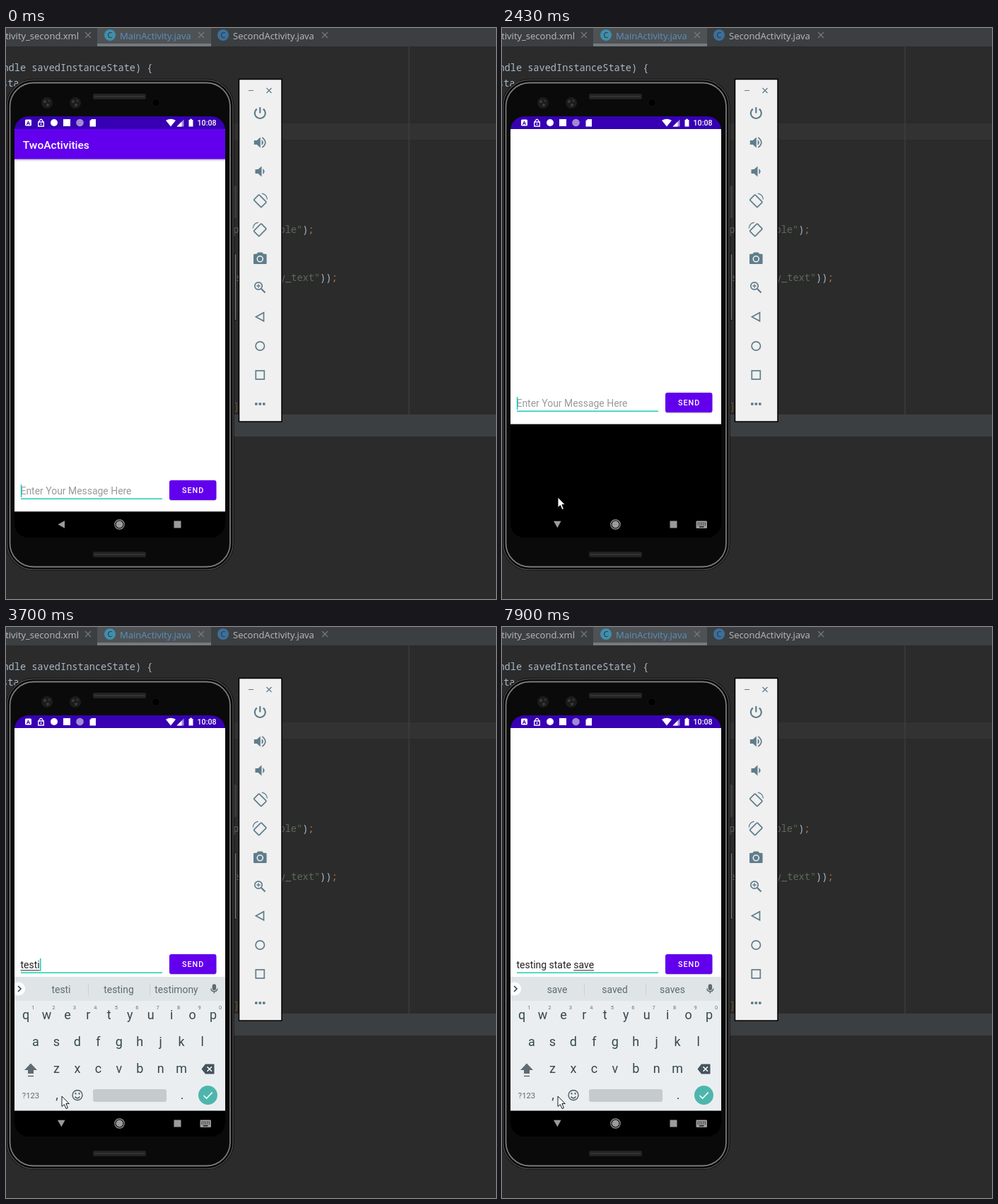
Animation of 693 by 808 pixels, one loop 8 s. Source, as an HTML page:

```html
<!DOCTYPE html>
<html lang="en">
<head>
<meta charset="utf-8">
<title>Message screen demo</title>
<style>
html, body { margin: 0; width: 100%; height: 100%; overflow: hidden; background: #2b2b2b; }
svg { display: block; width: 100%; height: 100%; }
text { white-space: pre; }
.tab { font: 13px "Open Sans", sans-serif; fill: #bbb; }
.code { font: 13.6px "Noto Sans Mono", monospace; fill: #a9b7c6; }
.str { fill: #5d6a56; }
.semi { fill: #b8743a; }
.ui { font-family: Roboto, sans-serif; }
.mid { text-anchor: middle; }
.field { font-size: 13.95px; }
.key { font-size: 18px; fill: #37474f; }
.digit { font-size: 7.5px; fill: #66737a; }
.word { font-size: 13.9px; fill: #5f6b73; }
.line { fill: none; stroke: #5f7d8c; stroke-width: 1.7; }
.thin { stroke-width: 1.3; }
.thick { stroke-width: 2.2; }
.solid { fill: #5f7d8c; }
</style>
</head>
<body>
<svg viewBox="0 0 693 808" preserveAspectRatio="none">
  <defs>
    <clipPath id="screen"><rect x="12" y="125" width="298" height="596" rx="20"/></clipPath>
    <clipPath id="window"><rect x="12" y="143" width="298" height="541.5"/></clipPath>
    <linearGradient id="shade" x2="0" y2="1"><stop stop-color="#b9b9bd"/><stop offset="1" stop-color="#fff"/></linearGradient>
    <path id="close" d="M-4-4 4 4M4-4-4 4" fill="none" stroke="#777b7e" stroke-width="1.1"/>
    <g id="sensor"><circle r="8" fill="#1c1c1c"/><circle cx="-3" cy="-2" r="2" fill="#3b3b3b"/><circle cx="3" cy="-3" r="1.6" fill="#343434"/><circle cx="1" cy="3" r="2" fill="#3b3b3b"/></g>
    <g id="speaker"><rect width="75" height="8" rx="2" fill="#232323"/><path d="M2 4H73" stroke="#333" stroke-width="2"/></g>
    <g id="volume"><path class="solid" d="M-8.5-3H-4.500L.5-7.500V7.500L-4.500 3H-8.5ZM2.300-4Q7 0 2.300 4Z"/></g>
    <g id="rotate"><rect class="line" x="-5.300" y="-7.500" width="10.600" height="15" rx="1" transform="translate(0 .8) rotate(-45)"/><path class="line thin" d="M2.500-9.800Q9.500-8.500 10-1.500"/></g>
  </defs>

  <!-- editor -->
  <rect width="693" height="808" fill="#2b2b2b"/>
  <rect y="135" width="693" height="23" fill="#323232"/>
  <path d="M570 26V547" stroke="#454545"/>
  <rect width="693" height="26" fill="#3c3f41"/>
  <rect x="129" width="161" height="26" fill="#4e5254"/>
  <rect x="129" y="22" width="161" height="4" fill="#747a80"/>
  <rect y="547" width="693" height="31" fill="#3c3f41"/>
  <g class="tab">
    <text x="103" y="15.5" text-anchor="end">activity_second.xml</text>
    <text x="161" y="15.5" style="fill:#5a8fc0">MainActivity.java</text>
    <text x="321" y="15.5">SecondActivity.java</text>
    <circle cx="147" cy="10" r="8" fill="#3f8fac"/>
    <circle cx="307" cy="10" r="8" fill="#3d6f9a"/>
    <g class="mid" font-size="11"><text x="147" y="14" style="fill:#23343d">C</text><text x="307" y="14" style="fill:#23343d">C</text></g>
  </g>
  <use href="#close" x="116" y="10"/><use href="#close" x="276" y="10"/><use href="#close" x="451" y="10"/>
  <g class="code">
    <text x="207.5" y="60.5" text-anchor="end">Bundle savedInstanceState) {</text>
    <text x="-6" y="83">sta</text>
    <text x="305" y="289.5"><tspan class="str">reply_visible"</tspan>)<tspan class="semi">;</tspan></text>
    <text x="322" y="357.5" class="str">e</text>
    <text x="387" y="357.5"><tspan class="str">y_text"</tspan>))<tspan class="semi">;</tspan></text>
    <text x="322" y="540" style="fill:#6b5428">]</text>
  </g>

  <!-- phone -->
  <rect x="319" y="223" width="7" height="46" rx="2" fill="#3c3c3c"/>
  <rect x="319" y="319" width="7" height="95" rx="2" fill="#151515"/>
  <path d="M324.5 320V413" stroke="#777" stroke-width="1.6"/>
  <rect y="72" width="322.5" height="696" rx="39" fill="#050505"/>
  <rect x="1.5" y="73.5" width="319.5" height="693" rx="37.5" fill="none" stroke="#484848" stroke-width="1.5"/>
  <rect x="5.5" y="77.5" width="311.5" height="685" rx="33.5" fill="#0a0a0a" stroke="#7c7c7c" stroke-width="1.8"/>
  <use href="#speaker" x="123" y="93"/><use href="#speaker" x="123" y="741"/>
  <use href="#sensor" x="58" y="106"/><use href="#sensor" x="98" y="106"/>
  <circle cx="212" cy="106" r="5.5" fill="#000" stroke="#141414"/>

  <g clip-path="url(#screen)" class="ui">
    <rect x="12" y="125" width="298" height="596" fill="#000"/>
    <g clip-path="url(#window)">
      <g id="app">
        <rect x="12" y="143" width="298" height="541.5" fill="#fff"/>
        <rect x="12" y="185" width="298" height="4" fill="url(#shade)"/>
        <rect x="12" y="143" width="298" height="42.5" fill="#6200ee"/>
        <text x="23.8" y="170.5" font-size="15.5" font-weight="500" fill="#fff">TwoActivities</text>
        <rect x="231" y="642" width="66.5" height="27.5" rx="3.5" fill="#000" opacity=".17"/>
        <rect x="231" y="640" width="66.5" height="28" rx="3" fill="#6200ee"/>
        <text x="249" y="658" font-size="10.85" font-weight="500" letter-spacing=".97" fill="#fff">SEND</text>
        <path d="M21 666.2H221" stroke="#1fcbb9" stroke-width="1.6"/>
        <text id="hint" class="field" x="20.5" y="660.3" fill="#9a9a9a">Enter Your Message Here</text>
        <text class="field" x="20.5" y="660.3" fill="#212121"><tspan id="done"></tspan><tspan id="active"></tspan></text>
        <rect id="underline" y="662.4" height="1" fill="#212121"/>
        <rect id="caret" y="646" width="1.6" height="18" fill="#1fcbb9"/>
      </g>
      <g id="keyboard">
        <rect x="12" y="495" width="298" height="190" fill="#eaeef1"/>
        <rect x="12" y="495" width="298" height="34" fill="#dfe4e7"/>
        <circle cx="17.5" cy="512" r="9.5" fill="#fff"/>
        <path d="M17 508 21 512 17 516" fill="none" stroke="#37474f" stroke-width="1.6"/>
        <path d="M116.5 504V521M203.5 504V521" stroke="#cbd1d5"/>
        <g id="words" class="word mid"></g>
        <g fill="none" stroke="#5f6b73" stroke-width="1.4"><rect x="292.4" y="506" width="4" height="7.5" rx="2" fill="#5f6b73"/><path d="M290 511.5Q290 515.8 294.4 515.8T298.8 511.5M294.4 516V518.5"/></g>
        <g id="keys" class="mid"></g>
        <path d="M35 617.5 44 627H39V632H31V627H26Z" fill="#5f6b73"/>
        <path d="M31 635.5H39" stroke="#5f6b73" stroke-width="1.6"/>
        <path d="M276.5 625.5 282 618.5H294.5V632.5H282Z" fill="#45535b"/>
        <path d="M284.5 622.3 291 628.8M291 622.3 284.5 628.8" stroke="#fff" stroke-width="1.5"/>
        <text class="mid" x="35" y="667" font-size="11.3" fill="#5f6b73">?123</text>
        <text class="key mid" x="72" y="668">,</text><text class="key mid" x="249" y="668">.</text>
        <g fill="none" stroke="#4c5a62" stroke-width="1.4"><circle cx="101" cy="662.5" r="7"/><path d="M97.5 664.5Q101 669 104.5 664.5"/><path d="M98.5 659V661.5M103.5 659V661.5" stroke-width="1.8"/></g>
        <rect x="123" y="654" width="104" height="18" rx="3" fill="#c5cacd"/>
        <circle cx="285.5" cy="662.5" r="13.5" fill="#4db6ac"/>
        <path d="M279.5 663 283.7 667 291.8 658.5" fill="none" stroke="#fff" stroke-width="1.7"/>
      </g>
    </g>

    <!-- status bar -->
    <rect x="12" y="125" width="298" height="18" fill="#3700b3"/>
    <g fill="#fff">
      <rect x="27" y="129.5" width="9" height="9" rx="1.5"/>
      <text class="mid" x="31.5" y="137" font-size="8" font-weight="700" style="fill:#3700b3">A</text>
      <path d="M47 133V131.5Q49.5 127 52 131.5V133M45.7 133H53.3V139H45.7Z" fill="none" stroke="#fff" stroke-width="1.3"/><circle cx="49.5" cy="136" r="1.1"/>
      <circle cx="68" cy="134" r="5"/>
      <rect x="81" y="129" width="10" height="10"/>
      <circle cx="104.5" cy="134" r="5.3" fill="#a08bd2"/>
      <path d="M121 129H127V139.5H118.5V131.5Z"/>
      <path d="M226 130.8Q233 126.5 240 130.8L233 139.5Z"/>
      <path d="M241.5 139.5 251.5 129.5V139.5Z" opacity=".55"/><path d="M241.5 139.5 248.5 132.5V139.5Z"/>
      <path d="M258.5 130H260V128.8H263V130H264.5V139.5H258.5Z"/>
      <text x="270.5" y="138" font-size="10.7" font-weight="500">10:08</text>
    </g>

    <!-- navigation bar -->
    <g fill="#9b9b9b">
      <path id="back" d="M73.5 702.5 83 697.2V707.8Z"/>
      <circle cx="160.5" cy="702.5" r="6.7" fill="none" stroke="#9b9b9b" stroke-width="1.2"/><circle cx="160.5" cy="702.5" r="5"/>
      <rect x="237.5" y="697.5" width="10" height="10" rx=".6"/>
      <g id="switcher"><rect x="274.5" y="697.5" width="15.5" height="10.5" rx="1.2"/><path d="M276.5 700.5H288.5M276.5 703H288.5" stroke="#000" stroke-width="1.2" stroke-dasharray="1.4 1.2"/><path d="M279 705.8H285.5" stroke="#000" stroke-width="1.2"/></g>
    </g>
  </g>

  <!-- emulator controls -->
  <rect x="329.5" y="72.5" width="60.5" height="484.5" fill="#f0f0f0" stroke="#000" stroke-width="1.5"/>
  <path d="M343 88.5H350M368.5 85 375.5 92M375.5 85 368.5 92" stroke="#5f7d8c" stroke-width="1.2"/>
  <path class="line thick" transform="translate(359.3 120.5)" d="M-4.5-6A7.5 7.5 0 1 0 4.5-6M0-8.5V0"/>
  <g transform="translate(359.3 162)"><use href="#volume"/><path class="line" d="M3-7.2Q12 0 3 7.2"/></g>
  <use href="#volume" x="361" y="203"/>
  <use href="#rotate" transform="translate(359.3 244)"/>
  <use href="#rotate" transform="translate(359.3 285) scale(-1 1)"/>
  <g transform="translate(359.3 326)"><path class="solid" d="M-8-6.3H-5L-3-8.5H3L5-6.3H8Q9.3-6.3 9.3-5V6.5Q9.3 8 8 8H-8Q-9.3 8-9.3 6.5V-5Q-9.3-6.3-8-6.3Z"/><circle cy=".8" r="4" fill="none" stroke="#f0f0f0" stroke-width="1.6"/></g>
  <g transform="translate(357 365)"><circle class="line" r="5.2"/><path class="line thick" d="M4 4 9.5 9.5"/><path class="line thin" d="M-2.7 0H2.7M0-2.7V2.7"/></g>
  <path class="line" d="M353.5 408.8 364.5 402.8V414.8Z"/>
  <circle class="line" cx="359.3" cy="450" r="6.2"/>
  <rect class="line" x="353.3" y="485" width="12" height="12"/>
  <g class="solid"><circle cx="353.8" cy="532" r="2"/><circle cx="359.3" cy="532" r="2"/><circle cx="364.8" cy="532" r="2"/></g>

  <path id="mouse" d="M0 0V14.5L3.4 11.5 6 17.5 8.4 16.5 5.9 10.5H10.2Z" fill="#fff" stroke="#000" stroke-width=".9"/>
</svg>
<script>
const LOOP = 8000, PAN = 177;
const $ = id => document.getElementById(id);
const clamp = (v, a = 0, b = 1) => Math.min(b, Math.max(a, v));
const progress = (t, from, to) => clamp((t - from) / (to - from));
const show = (id, on) => $(id).setAttribute('visibility', on ? 'inherit' : 'hidden');

function addText(parent, cls, x, y, content = '') {
  const el = document.createElementNS('http://www.w3.org/2000/svg', 'text');
  el.setAttribute('class', cls);
  el.setAttribute('x', x);
  el.setAttribute('y', y);
  el.textContent = content;
  return $(parent).appendChild(el);
}

[['qwertyuiop', 28, 554.5], ['asdfghjkl', 42, 592.5], ['zxcvbnm', 71.5, 631]].forEach(([row, x0, y], r) => {
  [...row].forEach((letter, i) => {
    const x = x0 + i * 29.45;
    addText('keys', 'key', x, y, letter);
    if (r === 0) addText('keys', 'digit', x + 10, 541, (i + 1) % 10);
  });
});
const words = [78, 159.5, 241].map(x => addText('words', 'word', x, 517.5));

// time, finished text, underlined word, suggestions
const typing = [
  [0, '', '', 'thanks I we'],
  [2940, '', 't', 't to the'],
  [3090, '', 'te', 'te tell text'],
  [3240, '', 'tes', 'tes test testing'],
  [3470, '', 'test', 'test testing tests'],
  [3700, '', 'testi', 'testi testing testimony'],
  [3930, '', 'testin', 'testin testing resting'],
  [4100, '', 'testing', 'testing Testing tasting'],
  [4330, 'testing ', '', 'the and it'],
  [4500, 'testing ', 's', 's so she'],
  [4670, 'testing ', 'st', 'st still stuff'],
  [4840, 'testing ', 'sta', 'sta start stay'],
  [5010, 'testing ', 'stat', 'stat state status'],
  [5180, 'testing ', 'state', 'state State statement'],
  [5500, 'testing state ', '', 'of and is'],
  [5620, 'testing state ', 's', 's so she'],
  [5730, 'testing state ', 'sa', 'sa said say'],
  [6040, 'testing state ', 'sav', 'sa said say'],
  [6120, 'testing state ', 'sav', 'sav save saved'],
  [6430, 'testing state ', 'save', 'save saved saves']
];
const caretToggles = [0, 560, 1050, 1570, 2130, 2600, 2690, 6890, 7420, 7900];

// time, x, y of the pointer tip
const pointerPath = [[270, 262, 763], [800, 215, 700], [1270, 166, 659], [1420, 166, 659], [1740, 81, 659], [2129, 81, 659], [2130, 79, 664]];

function pointerAt(t) {
  const next = pointerPath.findIndex(p => p[0] > t);
  if (next < 0) return pointerPath.at(-1).slice(1);
  const [t0, x0, y0] = pointerPath[Math.max(0, next - 1)], [t1, x1, y1] = pointerPath[next];
  const k = progress(t, t0, t1);
  return [x0 + (x1 - x0) * k, y0 + (y1 - y0) * k];
}

let shown;
function drawText(state) {
  if (state === shown) return;
  shown = state;
  const [, done, active, suggestions] = state;
  $('done').textContent = done;
  $('active').textContent = active;
  suggestions.split(' ').forEach((w, i) => words[i].textContent = w);
  const start = done ? $('done').getComputedTextLength() : 0;
  const width = active ? $('active').getComputedTextLength() : 0;
  $('underline').setAttribute('x', 20.5 + start);
  $('underline').setAttribute('width', width);
  $('caret').setAttribute('x', 20.8 + start + width);
  show('hint', !done && !active);
}

function draw(t) {
  drawText(typing.findLast(s => s[0] <= t));
  show('caret', caretToggles.filter(c => c <= t).length % 2 === 1);

  const pan = PAN * (1 - (1 - progress(t, 2250, 2650)) ** 2);
  $('app').setAttribute('transform', `translate(0 ${-pan})`);

  const rise = progress(t, 2630, 2770);
  show('keyboard', rise > 0);
  $('keyboard').setAttribute('opacity', rise);
  $('keyboard').setAttribute('transform', `translate(0 ${60 * (1 - rise) ** 2})`);

  const open = t >= 2130;
  $('back').setAttribute('transform', open ? 'rotate(-90 78.3 702.5)' : '');
  show('switcher', open);

  show('mouse', t >= 270);
  $('mouse').setAttribute('transform', `translate(${pointerAt(t)})`);
}

function frame() {
  draw(performance.now() % LOOP);
  requestAnimationFrame(frame);
}
frame();
</script>
</body>
</html>
```
